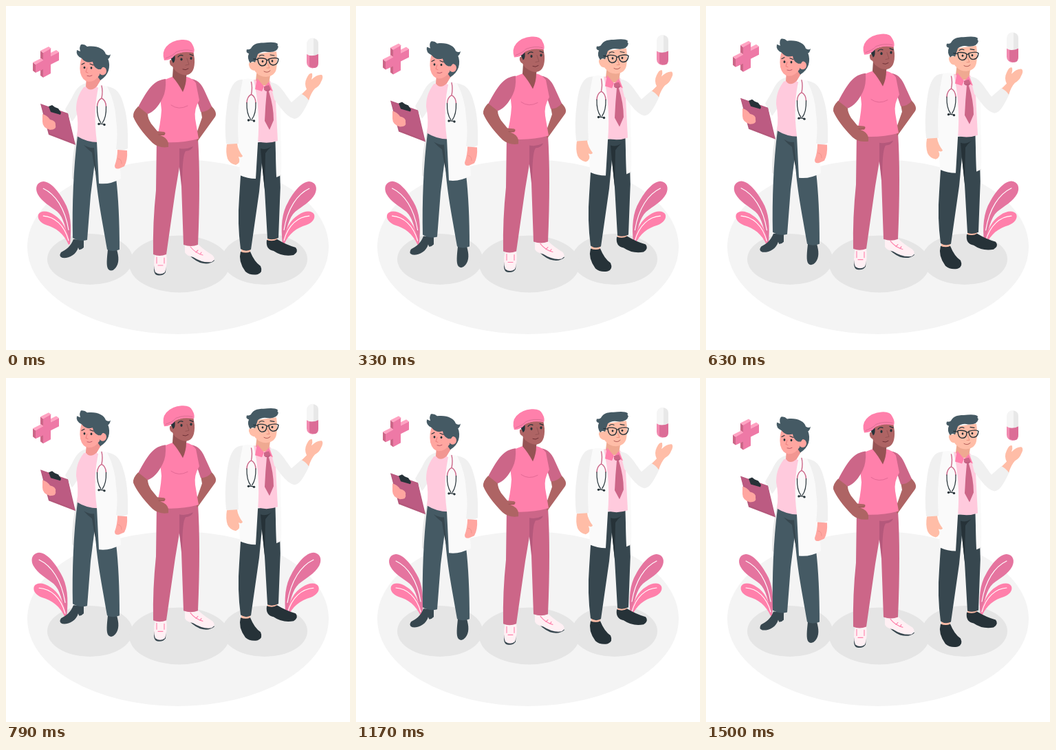
An HTML page with a canvas that plays this animation: 500x500 px, repeating every 1540 ms.

```html
<!DOCTYPE html>
<html lang="en">
<head>
<meta charset="utf-8">
<title>Medical team</title>
<style>
html, body { margin: 0; width: 100%; height: 100%; overflow: hidden; background: #fff; }
canvas { display: block; width: 100vw; height: 100vh; }
</style>
</head>
<body>
<canvas id="stage"></canvas>
<script>
const LOOP = 1540, BEAT = 1500, LEAD = 30, FRAME_RATE = 24;
const PINK = '#ff80ab', ROSE = '#cc6688', PALE = '#ffcadd', DEEP = '#b4587b';
const INK = '#263238', SLATE = '#455a64', NIGHT = '#37474f';
const COAT = '#fafafa', SLEEVE = '#f0f0f0', FOLD = '#e6e6e6';
const ROSY = '#ffa6a0', PEACH = '#ffbda7', BROWN = '#ae6464', UMBER = '#965354';

const canvas = document.getElementById('stage');
const ctx = canvas.getContext('2d');
const ratio = window.devicePixelRatio || 1;
canvas.width = canvas.height = 500 * ratio;

function fill(color, path) {
  ctx.fillStyle = color;
  ctx.fill(new Path2D(path));
}

function line(color, width, path) {
  ctx.strokeStyle = color;
  ctx.lineWidth = width;
  ctx.lineCap = ctx.lineJoin = 'round';
  ctx.stroke(new Path2D(path));
}

function oval(color, x, y, rx, ry = rx) {
  ctx.fillStyle = color;
  ctx.beginPath();
  ctx.ellipse(x, y, rx, ry, 0, 0, Math.PI * 2);
  ctx.fill();
}

function floor() {
  oval('#f4f4f4', 250, 350, 219, 127);
  oval('#e5e5e5', 122, 368, 62, 37);
  oval('#e5e5e5', 376, 368, 62, 37);
  oval('#e5e5e5', 252, 375, 73, 41.5);
}

function plant() {
  fill('#e5749f', 'M96 345C99 320 97 300 88 285C80 270 68 256 58 256C48 257 46 266 50 274C56 285 68 291 78 299C87 307 91 325 94 343Z');
  line('#fff', 1.1, 'M58 266C75 274 89 294 94 325');
  fill(PINK, 'M96 345C93 324 84 310 74 304C64 297 54 297 51 303C49 309 54 315 62 318C76 322 87 330 94 346Z');
  line('#fff', 1.1, 'M58 305C74 306 88 318 94 340');
}

function plants(scale) {
  ctx.save();
  ctx.translate(247.5, 300);
  ctx.scale(scale, scale);
  for (const side of [1, -1]) {
    ctx.save();
    ctx.scale(side, 1);
    ctx.translate(-247.5, -300);
    plant();
    ctx.restore();
  }
  ctx.restore();
}

function cross() {
  for (const [x, y, h] of [[54, 68, 11], [43, 85, 12], [54, 92, 12]])
    fill(ROSE, `M${x} ${y}v${h}l-4 -3v${-h}z`);
  for (const [x, y] of [[54, 68], [65, 73], [43, 85]])
    fill('#ffa3c2', `M${x} ${y}l12 -6l-4 -3l-12 6z`);
  fill('#ee79a6', 'M54 68L65 62V73L77 67V79L65 85V98L54 104V92L43 97V85L54 79Z');
}

function pill() {
  fill('#f5f5f5', 'M437 71V55A8.500 8.500 0 0 1 454 55V71Q445 76 437 71Z');
  fill('#e8e8e8', 'M447 47Q454 48 454 55V71Q451 73 447 73Z');
  fill('#f28ab0', 'M437 70V82A8.500 8.500 0 0 0 454 82V70Q445 75 437 70Z');
  fill('#dc6d97', 'M441 72V88Q454 94 454 82V70Q448 73 441 72Z');
}

function stethoscope(x, y) {
  ctx.save();
  ctx.translate(x, y);
  line(ROSE, 1.4, 'M0 -28Q2 -20 0 -10M-6.500 2Q-6 -7 0 -10Q6 -7 6.500 2');
  line(INK, 1.2, 'M-6.500 2Q-7 18 -1 26M6.500 2Q7 18 1 26M-4 27L4 28');
  oval(INK, -4, 27.5, 1.7);
  oval(INK, 4, 28.5, 1.7);
  ctx.restore();
}

function womanWithClipboard() {
  // legs
  fill(NIGHT, 'M98 339L113 340L113 351Q109 355 106 354L105 351C102 362 91 367 82 366Q76 364 80 358C87 354 94 350 98 339Z');
  fill(NIGHT, 'M148 354L161 354C164 364 165 374 159 381Q154 387 149 383C145 379 147 365 148 354Z');
  fill('#e9e9e9', 'M104 182Q95 219 96 251L101 254L107 193Z');
  fill(SLATE, 'M104 189L134 195L129 228L123 275L118 340Q107 343 97 337C96 290 98 234 104 189Z');
  fill(SLATE, 'M112 192L139 197L160 250Q165 292 165 354Q155 358 147 354C139 306 132 276 129 227Z');
  fill(NIGHT, 'M113 202Q121 207 128 206L132 250Q128 234 125 213Q118 208 113 202Z');
  // torso
  fill(SLEEVE, 'M118 112C107 113 101 122 96 133L86 150L96 168Q104 159 108 145L126 117Z');
  fill(PALE, 'M113 118C103 131 102 142 102 151Q106 170 103 189Q117 198 134 198L135 119Q125 114 113 118Z');
  fill(COAT, 'M135 115L149 117Q160 128 163 163L160 211Q167 235 167 251Q151 260 135 258L132 197Q126 151 135 115Z');
  fill(SLEEVE, 'M147 117C163 119 168 131 172 147Q178 168 177 207Q169 212 160 208Q163 184 160 166Q159 140 147 117Z');
  fill(ROSY, 'M162 209L176 210Q177 224 172 233L165 236Q158 238 158 232Q162 221 162 209Z');
  line('#ed8f89', 0.8, 'M163 222Q168 222 168 229');
  // clipboard
  fill(DEEP, 'M50 142L90 156L101 202L62 187Z');
  fill('#bc5b82', 'M51 143L90 157L99 199L64 185Z');
  fill(INK, 'M62 146L67 144L71 147L76 149L80 155L79 158L65 154Z');
  fill(ROSY, 'M53 157Q60 159 64 165Q73 167 72 173Q74 180 64 180Q53 177 53 168Z');
  // head
  fill('#f29691', 'M117 102L116 117Q122 126 132 117L138 107L133 94Z');
  fill(SLATE, 'M126 80L148 76C153 88 149 101 137 108L130 98Z');
  fill(ROSY, 'M111 72Q106 84 108 97Q111 109 120 110Q130 110 136 100L136 90L132 72Z');
  oval(ROSY, 140.5, 94.5, 5.5, 6);
  fill(SLATE, 'M110 76Q101 72 103 64L108 66Q106 60 109 56Q114 55 118 59C131 57 143 62 145 70Q150 73 152 70Q151 76 148 77L147 90Q142 85 138 92L134 92Q127 89 126 81Q116 84 110 76Z');
  oval(INK, 114, 89.5, 1.4, 1.8);
  oval(INK, 124, 90, 1.4, 1.8);
  line(INK, 1.1, 'M110 85L114 83M122 84L127 86');
  line('#e97979', 0.9, 'M118 90L116 96L119 97');
  line('#b74e60', 0.9, 'M118 101.500Q122 103 125 101');
  stethoscope(139, 144);
}

function nurse() {
  // legs
  fill(NIGHT, 'M216 372Q213 389 219 391Q228 393 232 387L233 372Z');
  fill('#fff0f4', 'M217 360L233 360Q235 376 231 387Q224 392 217 387Q213 378 217 360Z');
  line(PINK, 1.1, 'M219 365V374M230 366V374M221 377L228 377');
  fill(NIGHT, 'M260 355Q270 368 282 373Q295 377 303 370L300 367Z');
  fill('#fff0f4', 'M260 347L280 347Q287 354 300 362Q306 368 299 372Q286 374 272 365Q262 363 260 358Z');
  line(PINK, 1.1, 'M268 350Q275 359 286 362M279 355L276 358M284 358L282 361');
  fill(ROSE, 'M219 192L279 192Q283 253 279 347Q269 351 258 347L255 262L252 234L246 270L233 361Q223 365 214 361Q213 315 218 268Z');
  fill(DEEP, 'M252 207Q262 209 272 204Q270 210 261 211Q256 217 256 262L252 234Z');
  // torso and arms
  fill(BROWN, 'M297 144Q308 154 304 161L278 197Q275 190 278 182L285 162L283 151Z');
  fill(ROSE, 'M269 106Q281 107 288 122L299 146Q293 154 283 154L275 130Z');
  fill(PINK, 'M231 107L244 102L263 103Q271 105 276 112L281 137Q273 150 275 164L280 193Q250 201 218 197Q225 171 226 151Q222 128 231 107Z');
  fill(ROSE, 'M232 106C215 108 207 119 192 147Q199 154 206 157Q219 152 228 133Q233 123 232 106Z');
  fill(BROWN, 'M192 146L206 157Q206 163 211 171L220 182L230 183Q233 185 230 188L224 188Q234 191 236 199V205Q222 207 213 199C199 185 189 171 185 161Q184 154 192 146Z');
  line(UMBER, 0.8, 'M222 187Q229 188 231 185');
  line('#e36995', 1, 'M240 144Q251 152 264 145');
  // head
  fill(UMBER, 'M243 88L242 103Q250 112 257 125Q262 114 262 103L263 97Z');
  fill(BROWN, 'M241 72Q239 88 246 94Q256 102 264 100Q275 97 274 77L272 64Q256 66 241 72Z');
  fill(BROWN, 'M238 79Q244 76 246 82Q248 90 242 88Q237 86 238 79Z');
  fill(INK, 'M239 75L245 70Q247 80 243 83Z');
  fill(PINK, 'M230 79Q226 67 233 59Q241 50 255 49Q268 48 271 56Q275 63 273 68Q256 65 246 71Q240 79 230 79Z');
  line(ROSE, 0.7, 'M232 76Q243 72 247 67Q259 62 271 65');
  oval(INK, 255, 77.5, 1.6, 2.1);
  oval(INK, 269, 76, 1.6, 2.1);
  line(INK, 1.2, 'M250 74Q253 70 257 72M267 70L272 72');
  line(UMBER, 1, 'M263 76L266 85L261 86');
  line('#6e3036', 1, 'M257 92Q261 94 265 91');
}

function manWithGlasses() {
  // legs
  fill(PEACH, 'M342 350H355V359H342ZM380 334H394V344H380Z');
  fill(INK, 'M341 357Q349 360 355 357Q361 372 370 378Q374 387 366 390Q355 392 348 386Q337 371 341 357Z');
  fill(INK, 'M379 340Q388 343 394 339Q407 347 421 351Q426 357 418 362Q402 365 389 356Q377 354 379 340Z');
  fill(NIGHT, 'M344 200L393 196Q401 244 398 284L396 337Q387 341 380 338L376 268L372 228L368 270L356 354Q348 358 341 353Q336 316 339 278Z');
  fill(INK, 'M370 207Q378 210 386 204Q380 209 377 214L376 266L372 230Z');
  // coat, shirt and tie
  fill(FOLD, 'M385 113Q396 114 398 133L400 246L393 249L391 150Z');
  fill(COAT, 'M388 114Q397 119 399 150L400 245L393 248L391 180Z');
  fill(PALE, 'M360 107Q358 150 366 197Q380 201 395 196L391 119L383 108Z');
  fill(SLEEVE, 'M384 111C398 111 405 128 415 140L430 127Q439 129 441 136C432 155 426 164 419 164Q410 162 400 149L390 136Z');
  fill(PEACH, 'M430 128L437 121Q433 113 437 105Q441 96 445 98Q446 102 444 107Q452 99 459 100Q462 103 458 110Q456 116 449 120Q444 125 440 137Q436 131 430 128Z');
  fill(SLEEVE, 'M347 107C330 105 324 121 321 147Q317 174 320 200Q328 204 338 200L344 145Z');
  fill(COAT, 'M344 107Q351 104 360 107Q370 151 366 200L363 251Q351 251 340 246L337 180Q336 144 344 107Z');
  fill(PEACH, 'M321 201L336 200Q337 209 344 218Q343 221 338 219Q342 228 334 231Q325 229 322 222Q319 213 321 201Z');
  fill('#efa991', 'M365 91L363 108Q370 119 382 114L384 101Z');
  fill(PINK, 'M365 105L375 117L372 124L362 121ZM382 110L388 124L381 121L376 117Z');
  fill(ROSE, 'M375 117L382 115L385 121L382 124Q389 146 389 166L383 180L376 167Q377 144 379 124L375 122Z');
  line(DEEP, 0.9, 'M377 123L383 122');
  // head
  fill(PEACH, 'M361 70Q357 84 362 95Q368 103 378 103Q391 102 393 91Q395 80 393 66Z');
  fill(PEACH, 'M362 83Q352 79 353 86Q355 95 364 94Z');
  fill(SLATE, 'M355 83Q350 76 353 69Q348 68 350 63Q355 64 357 60C362 52 373 54 380 53Q391 52 395 55Q394 58 396 59Q394 68 381 67Q372 65 366 70L362 82Q358 79 355 83Z');
  line(INK, 1.4, 'M360 77L366 78M366 76Q378 75 379 79Q379 87 372 87Q366 86 366 76ZM382 77Q393 74 396 77Q395 86 388 86Q382 85 382 77ZM379 79L382 78');
  oval(INK, 373, 80.5, 1.4, 1.7);
  oval(INK, 387, 80, 1.4, 1.7);
  line(INK, 1.1, 'M368 73Q371 70 375 72M384 71L390 72');
  line('#e58c78', 0.9, 'M380 83L383 90L379 90');
  line('#a84e4c', 0.9, 'M375 95Q380 98 384 94');
  stethoscope(356.5, 138.5);
}

// Two quick pulses followed by a rest.
function pulse(time) {
  const progress = (from, span) => (time - from) / span;
  if (time < 150) return progress(0, 150);
  if (time < 450) return 1 - progress(150, 300);
  if (time < 600) return 0;
  if (time < 750) return progress(600, 150);
  if (time < 900) return 1 - progress(750, 150);
  return 0;
}

function draw(now) {
  const frame = Math.floor(((now % LOOP) + 4) * FRAME_RATE / 1000);
  const time = Math.min(frame, 36) * 1000 / FRAME_RATE + LEAD;
  const lift = 10 * Math.max(0, 1 - Math.abs(time / (BEAT / 2) - 1));

  ctx.setTransform(ratio, 0, 0, ratio, 0, 0);
  ctx.fillStyle = '#fff';
  ctx.fillRect(0, 0, 500, 500);
  floor();
  plants(1 + 0.1 * pulse(time));
  ctx.translate(0, 0.4 - lift);
  cross();
  pill();
  womanWithClipboard();
  nurse();
  manWithGlasses();
}

let start;
function tick(now) {
  start ??= now;
  draw(now - start);
  requestAnimationFrame(tick);
}
draw(0);
requestAnimationFrame(tick);
</script>
</body>
</html>
```
